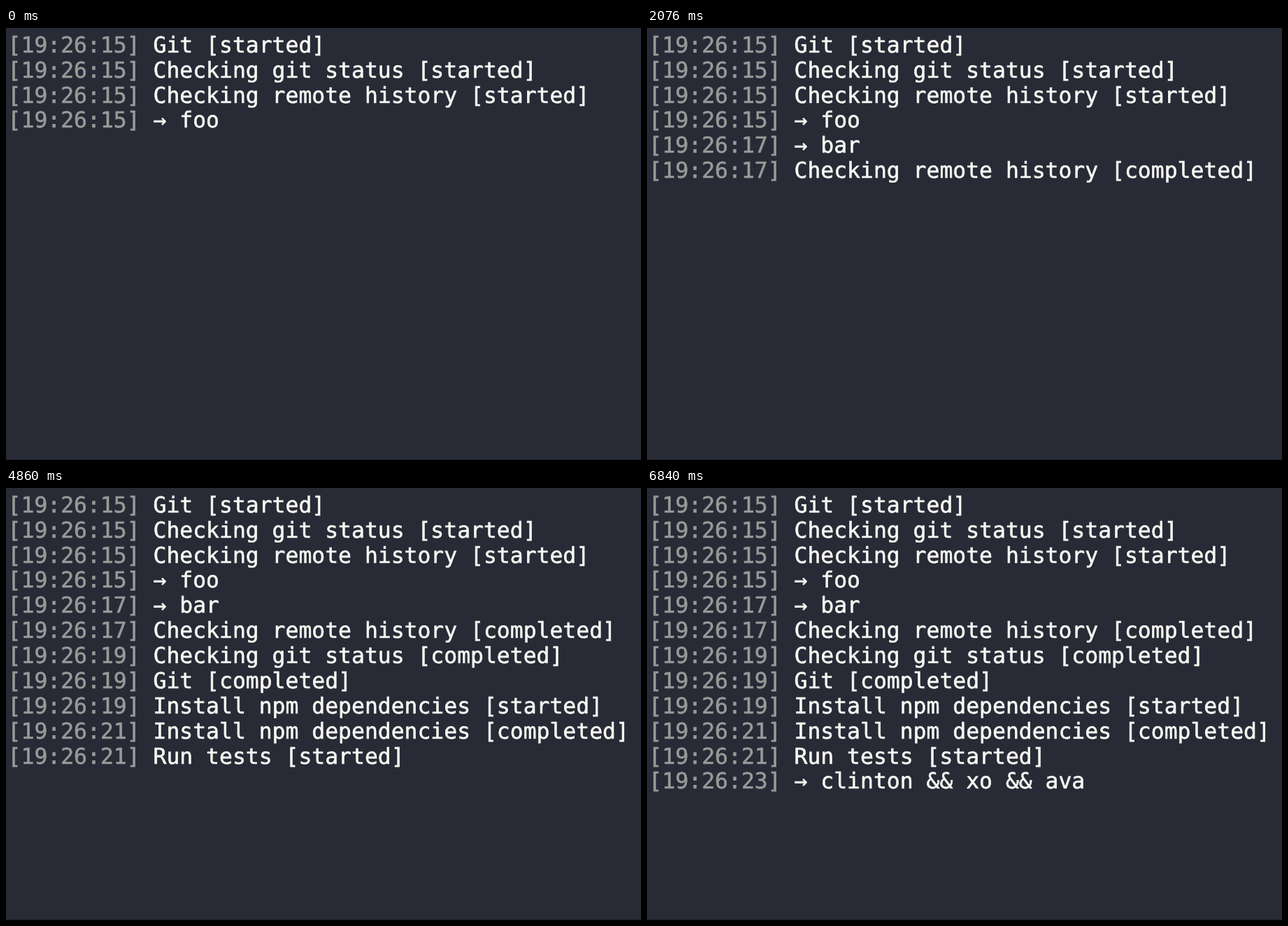
Recreate the animation shown at these times as an HTML page. Size 908 by 617 pixels, loop 8000 ms.

```html
<!DOCTYPE html>
<html lang="en">
<head>
<meta charset="utf-8">
<title>Task log</title>
<style>
  html, body { margin: 0; height: 100%; overflow: hidden; background: #282a36; }
  svg { display: block; }
  text {
    font: 31.4px "DejaVu Sans Mono", monospace;
    font-variant-ligatures: none;
    text-rendering: geometricPrecision;
    white-space: pre;
    fill: currentColor;
    stroke: currentColor;
    stroke-width: .6px;
    color: #f8f8f2;
  }
  .time { color: #999a98; }
</style>
</head>
<body>
<svg id="log" width="908" height="617" viewBox="0 0 908 617">
  <path d="M0 616.5H908" stroke="#20222b"/>
</svg>
<script>
const LOOP = 8000, LEFT = 2.6, BASELINE = 34.8, PITCH = 35.87, COLUMN = 18.9;

// Each entry: [start in ms, clock seconds, text]
const lines = [
  [0, 15, "Git [started]"],
  [0, 15, "Checking git status [started]"],
  [0, 15, "Checking remote history [started]"],
  [0, 15, "→ foo"],
  [870, 17, "→ bar"],
  [870, 17, "Checking remote history [completed]"],
  [2880, 19, "Checking git status [completed]"],
  [2880, 19, "Git [completed]"],
  [2880, 19, "Install npm dependencies [started]"],
  [4860, 21, "Install npm dependencies [completed]"],
  [4860, 21, "Run tests [started]"],
  [6840, 23, "→ clinton && xo && ava"],
];

const svg = document.getElementById("log");

function add(parent, tag, attrs, text = "") {
  const el = document.createElementNS(svg.namespaceURI, tag);
  for (const name in attrs) el.setAttribute(name, attrs[name]);
  el.textContent = text;
  return parent.appendChild(el);
}

const rows = lines.map(([start, seconds, text], i) => {
  const row = add(svg, "g", {});
  const y = BASELINE + i * PITCH;
  add(row, "text", { x: LEFT, y, class: "time" }, `[19:26:${seconds}]`);
  add(row, "text", { x: LEFT + 11 * COLUMN, y }, text);
  return { row, start };
});

const origin = performance.now();

function draw() {
  const t = (performance.now() - origin) % LOOP;
  for (const { row, start } of rows)
    row.setAttribute("visibility", t >= start ? "visible" : "hidden");
  requestAnimationFrame(draw);
}
draw();
</script>
</body>
</html>
```
